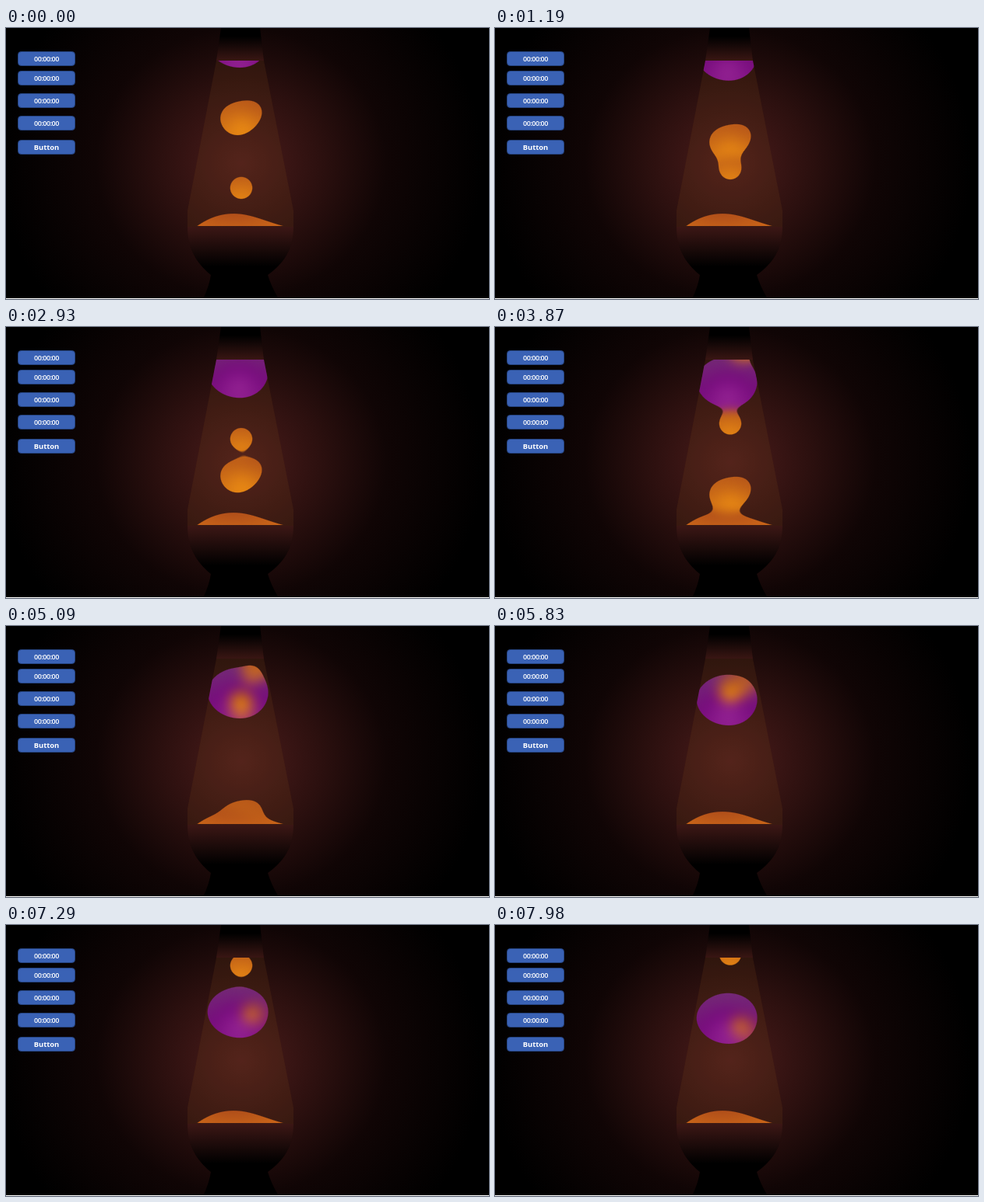
These frames come from a looping animation (620 by 349 pixels, 8 s). An HTML page:

```html
<!DOCTYPE html>
<html lang="en">
<head>
<meta charset="utf-8">
<title>Lava lamp</title>
<style>
  html, body { margin: 0; width: 100%; height: 100%; overflow: hidden; background: #fff; }
  svg { display: block; width: 620px; height: 348px; }
  text { font: 600 9px "Open Sans", "Noto Sans", sans-serif; letter-spacing: -.5px; fill: #fff; text-anchor: middle; }
  text.label { font-size: 9.4px; font-weight: 700; letter-spacing: 0; }
</style>
</head>
<body>
<svg viewBox="0 0 620 348">
  <defs>
    <radialGradient id="glow" gradientUnits="userSpaceOnUse" cx="0" cy="0" r="1"
      gradientTransform="translate(302 174) scale(310 290)">
      <stop stop-color="#4c1c1b"/>
      <stop offset=".33" stop-color="#2c100f"/>
      <stop offset=".6" stop-color="#100505"/>
      <stop offset="1" stop-color="#000"/>
    </radialGradient>
    <linearGradient id="cap" x2="0" y2="1">
      <stop offset=".25" stop-color="#000"/>
      <stop offset="1" stop-color="#391613"/>
    </linearGradient>
    <linearGradient id="foot" x2="0" y2="1">
      <stop stop-color="#3c1715"/>
      <stop offset=".55" stop-color="#000"/>
    </linearGradient>
    <radialGradient id="orange" cx=".5" cy=".82" r=".85">
      <stop stop-color="#f19112"/>
      <stop offset="1" stop-color="#ae4e1a"/>
    </radialGradient>
    <radialGradient id="purple" cx=".52" cy=".82" r=".85">
      <stop stop-color="#982696"/>
      <stop offset=".5" stop-color="#760a7c"/>
      <stop offset="1" stop-color="#723472"/>
    </radialGradient>
    <linearGradient id="pool" gradientUnits="userSpaceOnUse" x1="0" x2="0" y1="238" y2="257">
      <stop stop-color="#a2421b"/>
      <stop offset="1" stop-color="#ca6518"/>
    </linearGradient>
    <filter id="goo" filterUnits="userSpaceOnUse" x="190" y="-60" width="220" height="390"
      color-interpolation-filters="sRGB">
      <feGaussianBlur stdDeviation="8"/>
      <feColorMatrix values="1 0 0 0 0  0 1 0 0 0  0 0 1 0 0  0 0 0 18 -7.3"/>
    </filter>
    <clipPath id="inside"><path d="M270 42H331L369 235V255H233V235Z"/></clipPath>
  </defs>

  <rect width="620" height="348" fill="url(#glow)"/>
  <path d="M270 42H331L369 235V256H233V235Z" fill="#74441c" fill-opacity=".2"/>

  <g clip-path="url(#inside)">
    <g filter="url(#goo)">
      <path id="violet" fill="url(#purple)"
        d="M-38.7 -33.5C-38.7 -51 -18 -64.5 1 -64.5C23 -64.5 38.7 -52 38.7 -33.5C38.7 -15.5 24 -.7 3 -.7C-22 -.7 -38.7 -18 -38.7 -33.5Z"/>
      <circle id="ember" r="13" fill="url(#orange)" opacity=".75"/>
      <path id="large" fill="url(#orange)"
        d="M-27 -1C-27 -18 -2 -22 11 -22C23 -22 27 -16 27 -9C27 4 10 22 -5 22C-19 22 -27 10 -27 -1Z"/>
      <circle id="small" r="15" fill="url(#orange)"/>
      <path fill="url(#pool)" transform="translate(0 1)"
        d="M222 274L245 255.5C262 243 278 239 292 239C315 239 333 250 356 255.5L385 263V300H222Z"/>
    </g>
  </g>

  <path d="M276 0H326L331 42H270Z" fill="url(#cap)"/>
  <path d="M233 256C233 285 245 303 263 318Q261 332 253 349H350Q340 332 336 318C357 303 369 285 369 256Z" fill="url(#foot)"/>
  <g id="buttons"></g>
</svg>
<script>
  const LOOP = 8000;
  const byId = id => document.getElementById(id);

  byId("buttons").innerHTML = [30.5, 55.5, 84.5, 113.5, 144.5].map((y, i) => {
    const last = i === 4;
    return `<rect x="15.5" y="${y}" width="73" height="18" rx="4" fill="#3a62b5" stroke="#25437f"/>
      <text x="52" y="${y + 12}" class="${last ? "label" : "time"}">${last ? "Button" : "00:00:00"}</text>`;
  }).join("");

  // Horizontal position and height over time (seconds) of each blob
  const blobs = {
    violet: [297.5, t => 51 + 14.3 * t - 0.19 * t * t],
    ember: [316, t => -60 + 23.8 * t],
    large: [302, t => 116 + 25.7 * t],
    small: [302, t => 206 - 21.1 * t],
  };

  function draw() {
    const t = (performance.now() % LOOP) / 1000;
    for (const [id, [x, y]] of Object.entries(blobs)) {
      byId(id).setAttribute("transform", `translate(${x} ${y(t)})`);
    }
    requestAnimationFrame(draw);
  }
  draw();
</script>
</body>
</html>
```
